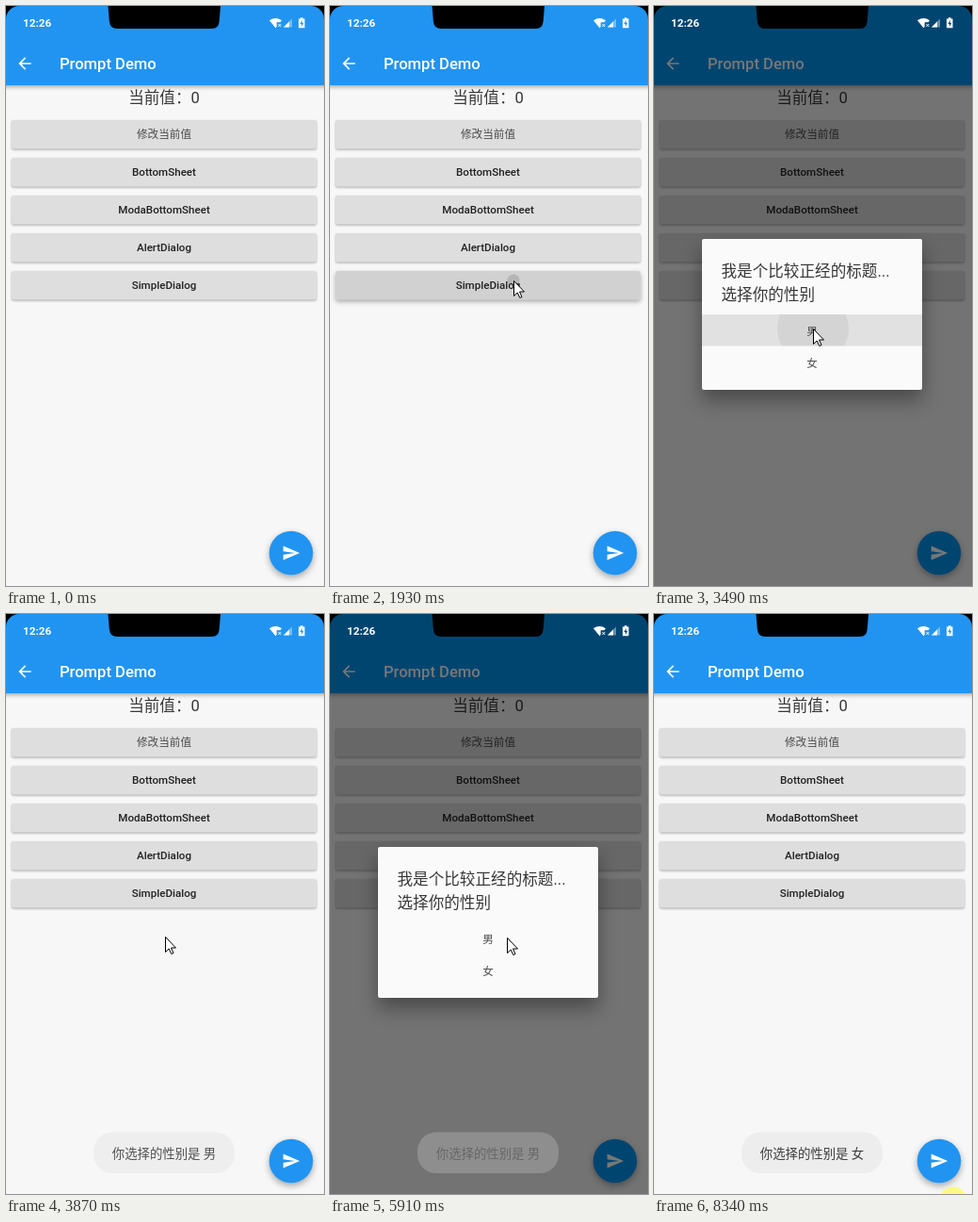
These frames come from a looping animation (338x615 px, 8.58 s). An HTML page:

```html
<!DOCTYPE html>
<html lang="zh-CN">
<head>
<meta charset="utf-8">
<title>Prompt Demo</title>
<style>
  html, body { margin: 0; width: 100%; height: 100%; overflow: hidden; background: #f7f7f7; }
  svg { display: block; }
  text { font-family: Roboto, "Noto Sans CJK SC", "Noto Sans CJK", sans-serif; }
  .mid { text-anchor: middle; }
  .label { font-size: 11.6px; font-weight: 500; fill: #222; }
  .light { font-weight: 400; fill: #4a4a4a; }
  .big { font-size: 16.6px; fill: #383838; }
  .bar { fill: var(--blue); filter: drop-shadow(0 2px 2px rgba(0, 0, 0, .32)); }
  .fab { fill: var(--blue); filter: drop-shadow(0 3px 3.5px rgba(0, 0, 0, .33)); }
  .button { fill: #dedede; filter: drop-shadow(0 1.2px 1px rgba(0, 0, 0, .32)); }
  .sheet { fill: #fafafa; filter: drop-shadow(0 11px 10px rgba(0, 0, 0, .36)); }
</style>
</head>
<body>
<svg id="stage" width="338" height="615" viewBox="0 0 338 615">
  <rect width="338" height="615" fill="#f7f7f7"/>
  <text class="big mid" x="168" y="103.4">当前值：0</text>
  <rect class="bar" x="-5" y="-5" width="348" height="89"/>
  <path transform="translate(10 51) scale(.833)" fill="#fff"
    d="M20 11H7.83l5.59-5.59L12 4l-8 8 8 8 1.41-1.41L7.83 13H20z"/>
  <text x="57" y="67" font-size="16.6" font-weight="500" fill="#fff">Prompt Demo</text>

  <g id="buttons"></g>
  <svg id="buttonInk" x="6" y="281" width="324" height="30.5">
    <rect width="324" height="31" rx="2"/><circle/>
  </svg>
  <text class="label mid" x="168" y="300.3">SimpleDialog</text>

  <circle class="fab" cx="303" cy="580" r="23.3"/>
  <path transform="translate(293 570) scale(.833)" fill="#fff" d="M2 21 23 12 2 3v7l15 2-15 2z"/>

  <rect id="barrier" width="338" height="615"/>
  <g id="dialog">
    <rect class="sheet" x="51" y="247" width="234" height="160" rx="2"/>
    <svg id="rowInk" x="51" width="234" height="33.5">
      <rect width="234" height="34"/><circle/>
    </svg>
    <text class="big" x="71.5" y="286.6">我是个比较正经的标题...</text>
    <text class="big" x="71.5" y="311.6">选择你的性别</text>
    <text class="label light mid" x="168" y="349">男</text>
    <text class="label light mid" x="168" y="382.5">女</text>
  </g>

  <g id="toast">
    <rect x="93" y="549.5" width="150" height="43.5" rx="20" fill="#ededed"/>
    <text id="toastText" class="mid" x="168" y="577" font-size="13.4" fill="#3c3c3c"></text>
  </g>

  <g fill="#fff">
    <text x="18" y="22" font-size="11.7" font-weight="600">12:26</text>
    <path d="M280 15.3Q286.5 10.8 293 15.3L291.5 17.2H287.7V22L286.5 23.3Z"/>
    <path d="M289.3 19l3 3m0-3l-3 3" stroke="#fff"/>
    <path d="M295 22.5H304V13.5Z" opacity=".4"/>
    <path d="M295 22.5H301V16.5Z"/>
    <path fill-rule="evenodd" d="M311 13.5H313V12.3H315.5V13.5H317.5V23.3H311ZM314.7 15L312.5 19H314V22L316.2 18H314.7Z"/>
  </g>
  <path d="M108.5 0L109.8 16Q110.5 24 118 24H219Q226 24 226.700 16L228 0Z"/>
  <path d="M0 0H14A14 14 0 0 0 0 14ZM338 0H324A14 14 0 0 1 338 14Z"/>

  <circle id="click" r="15" fill="#ff0" opacity=".47"/>
  <path id="cursor" fill="#fff" stroke="#000" stroke-linejoin="round"
    d="M.5 .5V16.5L4.200 13L6.800 18.500L9 17.500L6.500 12H11.500Z"/>
</svg>
<script>
const LOOP = 8580;
const $ = id => document.getElementById(id);
const set = (node, attrs) => {
  for (const name in attrs) node.setAttribute(name, attrs[name]);
};
const ramp = (t, from, to) => Math.min(1, Math.max(0, (t - from) / (to - from)));
const easeOut = (u, power) => 1 - (1 - u) ** power;
const fade = (t, from, to) => easeOut(ramp(t, from, to), 3);

// Each tap lights its surface from release until the dialog has opened or closed.
const taps = [
  { down: 1600, up: 1800, done: 2010, x: 195, y: 291, speed: .05, ink: 'buttonInk', top: 281 },
  { down: 3180, up: 3360, done: 3740, x: 169, y: 342, speed: .29, ink: 'rowInk', top: 327 },
  { down: 5080, up: 5310, done: 5560, x: 217, y: 300, speed: .27, ink: 'buttonInk', top: 281 },
  { down: 6620, up: 6800, done: 7130, x: 167, y: 375, speed: .29, ink: 'rowInk', top: 360.5 },
  { down: 8340, up: LOOP, done: LOOP, x: 318, y: 622.5 }
];
const enter = { start: 310, end: 1380, x: 310, y: 544 };
const moves = [
  { start: 310, end: 1130, x: 205, y: 280 },
  { start: 1180, end: 1380, ...at(taps[0]) },
  { start: 2460, end: 2980, ...at(taps[1]) },
  { start: 4240, end: 4860, ...at(taps[2]) },
  { start: 5505, end: 6340, ...at(taps[3]) },
  { start: 7130, end: 7910, x: 318, y: 612 }
];
function at({ x, y }) { return { x, y }; }

const labels = ['修改当前值', 'BottomSheet', 'ModaBottomSheet', 'AlertDialog', ''];
$('buttons').innerHTML = labels.map((label, i) => `
  <rect class="button" x="6" y="${121 + i * 40}" width="324" height="30.5" rx="2"/>
  <text class="label mid ${i ? '' : 'light'}" x="168" y="${140.4 + i * 40}">${label}</text>`).join('');
const pressedButton = $('buttons').querySelector('rect:last-of-type');

function drawInk(id, t, tint, splash, visible) {
  const tap = taps.find(p => p.ink === id && t > p.up - 50 && t < p.done);
  const press = tap ? ramp(t, tap.up - 50, tap.up + 50) * visible : 0;
  const [surface, circle] = $(id).children;
  set(surface, { opacity: press * tint });
  set(circle, { opacity: press * splash });
  if (tap) {
    set($(id), { y: tap.top });
    set(circle, {
      cx: tap.x - $(id).getAttribute('x'),
      cy: tap.y - tap.top,
      r: Math.max(0, t - tap.up) * tap.speed
    });
  }
  return press;
}

function drawCursor(t) {
  let { x, y } = enter;
  for (const move of moves) {
    const u = easeOut(ramp(t, move.start, move.end), 1.3);
    x += (move.x - x) * u;
    y += (move.y - y) * u;
  }
  set($('cursor'), {
    transform: `translate(${Math.floor(x)} ${Math.floor(y)})`,
    visibility: t >= enter.start && t < 7910 ? 'visible' : 'hidden'
  });
  const click = taps.find(p => t >= p.down && t < p.up);
  set($('click'), { visibility: click ? 'visible' : 'hidden' });
  if (click) set($('click'), { cx: click.x, cy: click.y });
}

function draw(t) {
  const shown = fade(t, 1980, 2010) - fade(t, 3590, 3740)
    + fade(t, 5440, 5560) - fade(t, 6870, 7130);
  const toast = ramp(t, 3640, 3900) - ramp(t, 5600, 6000) + ramp(t, 7150, 7450);

  const press = drawInk('buttonInk', t, .06, .13, 1 - shown);
  pressedButton.style.filter =
    `drop-shadow(0 ${1.2 + press * 1.6}px ${1 + press * 1.4}px rgba(0, 0, 0, .32))`;
  drawInk('rowInk', t, .1, .06, 1);

  $('stage').style.setProperty('--blue', `rgb(${33 * (1 - shown)}, 148, 241)`);
  set($('barrier'), { opacity: shown * .535 });
  set($('dialog'), { opacity: shown });
  set($('toast'), { opacity: toast });
  $('toastText').textContent = '你选择的性别是 ' + (t < 6500 ? '男' : '女');
  drawCursor(t);
}

const start = performance.now();
function tick() {
  draw((performance.now() - start) % LOOP);
  requestAnimationFrame(tick);
}
draw(0);
requestAnimationFrame(tick);
</script>
</body>
</html>
```
